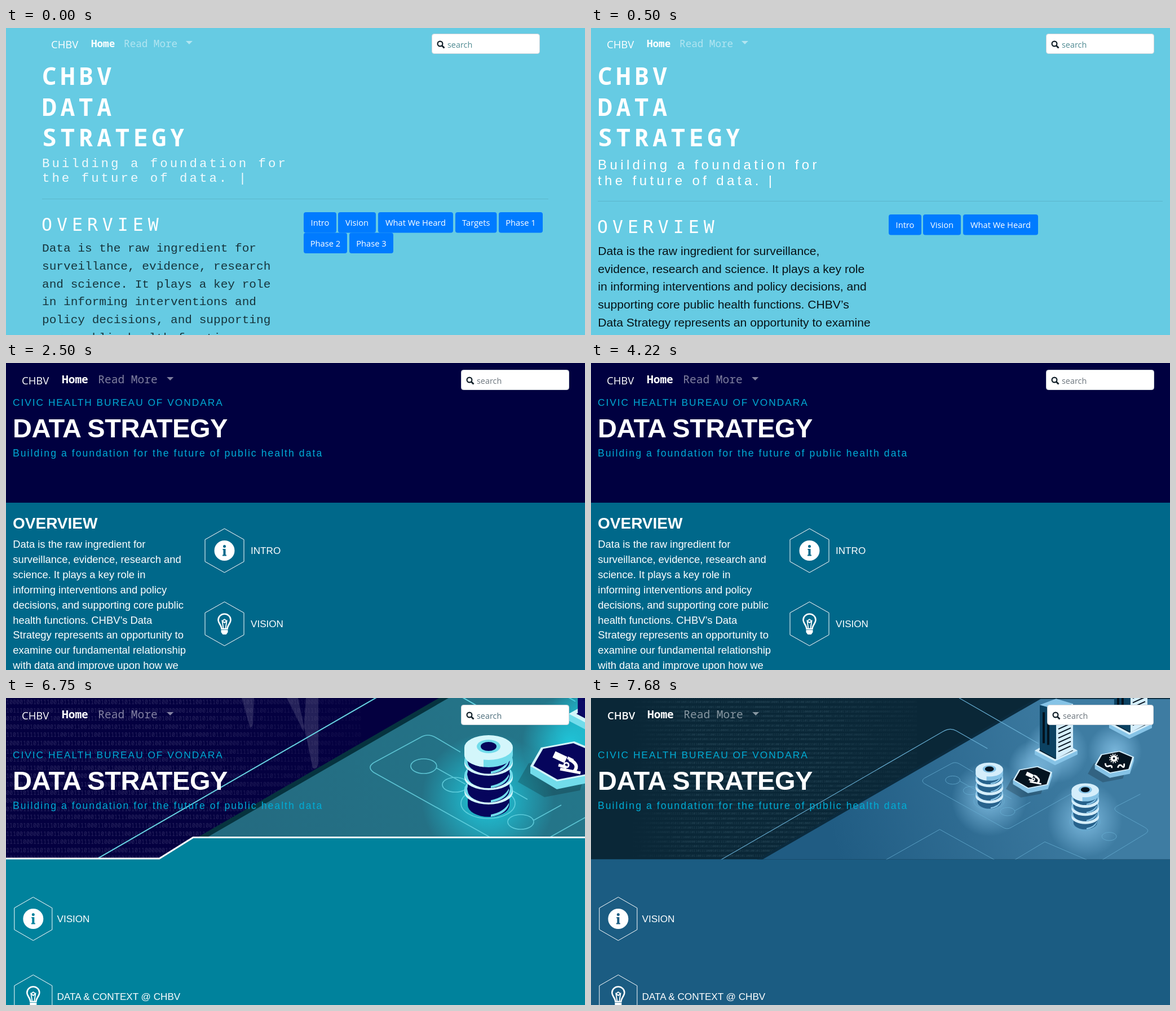
An HTML page for the animation above (8000 ms loop, 1027 by 545 pixels).

```html
<!DOCTYPE html>
<html lang="en">
<head>
<meta charset="utf-8">
<title>Data Strategy</title>
<style>
html, body { margin: 0; width: 100%; height: 100%; overflow: hidden; }
svg { display: block; width: 100vw; height: 100vh; }
text { white-space: pre; }
.ui { font-family: "Open Sans", "Noto Sans", sans-serif; }
.code { font-family: "Noto Sans Mono", monospace; }
.wide { font-family: "DejaVu Sans Mono", monospace; }
.type { font-family: "Liberation Mono", monospace; }
.sans { font-family: "Liberation Sans", Arial, sans-serif; }
</style>
</head>
<body>
<svg id="stage" viewBox="0 0 1027 545" preserveAspectRatio="none"></svg>
<script>
const ORG = 'CHBV', AGENCY = 'CIVIC HEALTH BUREAU OF VONDARA';
const TAGLINE = 'Building a foundation for the future of public health data';

const text = (cls, x, y, size, str, fill = '#fff', extra = '') =>
  `<text class="${cls}" x="${x}" y="${y}" font-size="${size}" fill="${fill}" ${extra}>${str.replace(/&/g, '&amp;')}</text>`;
const lines = (cls, x, y, step, size, list, fill, extra) =>
  list.map((s, i) => text(cls, x, y + i * step, size, s, fill, extra)).join('');
const spaced = n => `letter-spacing="${n}"`;
const bold = 'font-weight="700" ';
const rect = (x, y, w, h, fill, extra = '') =>
  `<rect x="${x}" y="${y}" width="${w}" height="${h}" fill="${fill}" ${extra}/>`;
const path = (d, fill, extra = '') => `<path d="${d}" fill="${fill}" ${extra}/>`;
const oval = (x, y, rx, ry, fill, extra = '') =>
  `<ellipse cx="${x}" cy="${y}" rx="${rx}" ry="${ry}" fill="${fill}" ${extra}/>`;
const at = (x, y, body, k = 1) => `<g transform="translate(${x} ${y}) scale(${k})">${body}</g>`;

function nav({ x = 28, y = 0, size = 17.6, muted, hint, boxX = 835 - x, weight = 400 }) {
  const pitch = size * .6, home = x + 71, more = home + pitch * 5.5;
  const caret = more + pitch * 10.5 - 1;
  return text('ui', x, 36 + y, 18.5, ORG, '#fff', `font-weight="${weight}"`) +
    text('code', home, 34 + y, size, 'Home', '#fff', 'font-weight="600"') +
    text('code', more, 34 + y, size, 'Read More', muted) +
    path(`M${caret} ${23 + y}h12l-6 6z`, muted) +
    rect(boxX + .5, 10.5 + y, 1026 - x - boxX, 35, '#fff', 'rx="4" stroke="#ced4da"') +
    `<g fill="none" stroke="#111f28" stroke-width="2.2"><circle cx="${boxX + 15}" cy="${28 + y}" r="4.4"/>` +
    `<path d="M${boxX + 18} ${31 + y}l4.5 4.5" stroke-width="2.8"/></g>` +
    text('ui', boxX + 28, 35 + y, 14.4, 'search', hint);
}

const button = (x, y, w, label) => rect(x, y, w, 36.5, '#007bff', 'rx="4"') +
  text('ui', x + w / 2, y + 24, 14.7, label, '#fff', 'text-anchor="middle"');

function lightPage(x, shift, rest) {
  return rect(0, 0, 1027, 545, '#66cbe3') +
    nav({ x: x + 16, muted: '#b2e5f1', hint: '#4f8a92' }) +
    lines('code', x, 101, 54.5, 43, [ORG, 'DATA', 'STRATEGY'], '#fff', bold + spaced(6.6)) +
    rect(x, 303 + shift, 1027 - 2 * x - 1, 1, '#5bb7cc') +
    text('wide', x - 1, 359.5 + shift, 31.5, 'OVERVIEW', '#fff', spaced(8)) +
    button(528, 327 + shift, 58, 'Intro') + button(589, 327 + shift, 67, 'Vision') +
    button(660, 327 + shift, 133, 'What We Heard') + rest;
}

const monoPage = () => lightPage(64, 0,
  button(797, 327, 73.5, 'Targets') + button(874, 327, 78, 'Phase 1') +
  button(528, 363.5, 77, 'Phase 2') + button(609, 363.5, 78, 'Phase 3') +
  lines('type', 64, 247, 25.5, 22.4,
    ['Building a foundation for', 'the future of data. |'], '#f0fafd', spaced(4)) +
  lines('type', 64, 397, 31.75, 21.12,
    ['Data is the raw ingredient for', 'surveillance, evidence, research', 'and science. It plays a key role',
      'in informing interventions and', 'policy decisions, and supporting', 'core public health functions.'], '#17353d'));

const arialPage = () => lightPage(12, 4,
  lines('sans', 12, 251, 27.5, 24,
    ['Building a foundation for', 'the future of data. |'], '#fff', spaced(5.4)) +
  lines('sans', 12.3, 403, 31.7, 21.12,
    ['Data is the raw ingredient for surveillance,', 'evidence, research and science. It plays a key role',
      'in informing interventions and policy decisions, and', `supporting core public health functions. ${ORG}’s`,
      'Data Strategy represents an opportunity to examine'], '#071318'));

const title = y => text('sans', 12, y, 17.3, AGENCY, '#00add6', spaced(2)) +
  text('sans', 12, y + 56, 47, 'DATA STRATEGY', '#fff', bold + spaced(-.5)) +
  text('sans', 12, y + 90, 17.6, TAGLINE, '#00add6', spaced(2.05));

const info = bg => oval(0, 0, 18, 18, '#fff') + oval(0, -7.5, 2.5, 2.5, bg) +
  path('M-3-3h5v10.5h1.5v2h-7v-2h1.5v-8.5h-1z', bg);
const bulb = () => `<g fill="none" stroke="#fff" stroke-width="2.6">
  <path d="M-5 9C-5 3-11-1-11-7A11 10.5 0 0 1 11-7C11-1 5 3 5 9z"/>
  <path d="M-2 8L-4-5L0-2L4-5L2 8M-4-5L0-8L4-5" stroke-width="1.8"/></g>` +
  path('M-6 11H6V15L3 19H-3L-6 15z', '#fff');

const badge = (x, y, w, h, icon, label, gap) =>
  at(x, y, path(`M0 ${-h}L${w} ${-h / 2}V${h / 2}L0 ${h}L${-w} ${h / 2}V${-h / 2}z`, 'none', 'stroke="#fff"') + icon) +
  text('sans', x + gap, y + 5.5, 17.1, label);

const plainPage = () => rect(0, 0, 1027, 545, '#00688a') + rect(0, 0, 1027, 248, '#000040') +
  nav({ y: 2, size: 19.5, muted: '#80809f', hint: '#6c757d' }) + title(76) +
  text('sans', 12, 294, 28, 'OVERVIEW', '#fff', bold) +
  lines('sans', 12.3, 328, 26.9, 18.4,
    ['Data is the raw ingredient for', 'surveillance, evidence, research and', 'science. It plays a key role in',
      'informing interventions and policy', 'decisions, and supporting core public', `health functions. ${ORG}’s Data`,
      'Strategy represents an opportunity to', 'examine our fundamental relationship', 'with data and improve upon how we']) +
  badge(387.5, 333, 34.5, 39, info('#00688a'), 'INTRO', 46.5) +
  badge(387.5, 463, 34.5, 39, bulb(), 'VISION', 46.5);

function digits() {
  let seed = 7, out = '';
  for (let y = -135; y < 375; y += 14.6) {
    let row = '';
    for (let i = 0; i < 155; i++) {
      seed = (seed * 16807) % 2147483647;
      row += seed % 100 < 50 ? '0' : '1';
    }
    out += `<text x="-300" y="${y}">${row}</text>`;
  }
  return out;
}

const cylinder = (y, rx, ry, h, side, top) =>
  path(`M${-rx} ${y}v${h}a${rx} ${ry} 0 0 0 ${2 * rx} 0v${-h}z`, side) + oval(0, y, rx, ry, top);

// Isometric scene shared by both illustrated pages.
function art(id, c) {
  const glow = (x, y, r) => `<circle cx="${x}" cy="${y}" r="${r}" fill="url(#glow${id})"/>`;
  let coins = '';
  for (let y = 88; y >= 0; y -= 25.5) {
    coins += cylinder(y, 37, 21, 12, c.coin, c.coin) +
      path(`M4 ${y + 29}Q28 ${y + 24} 36 ${y + 8}V${y + 12}Q30 ${y + 29} 4 ${y + 33}z`, c.mid);
    if (y > 20) coins += cylinder(y - 16, 43, 22, c.rim, c.light, c.mid) + oval(0, y - 17, 38, 18, c.coin);
  }
  coins += cylinder(-2, 43, 22, 13, c.mid, c.light) + path('M-43-2v13a43 22 0 0 0 34 21.5v-14z', c.light) +
    oval(0, -4, 21, 12, c.mid) + oval(0, -4, 14, 8, c.ink);
  const hex = 'M-60 8L-41-25L18-36L63-17L50 23L-13 35z';
  const tile = mark => path(hex, '#0003', 'transform="translate(-22 28)"') +
    path('M-60 8V21L-13 49L50 36L63-4V-17z', c.mid) + path(hex, c.light) +
    path(hex, c.ink, 'transform="scale(.91)"') + mark;
  const scope = `<g fill="none" stroke="#fff"><path d="M-18-13L3-3" stroke-width="12"/>
    <path d="M6-7L16-2" stroke-width="5"/><path d="M9-4Q28 5 18 17" stroke-width="6"/>
    <path d="M-7 13L29 20M-10 6L4 10" stroke-width="5"/><circle cx="4" cy="6" r="4" stroke-width="3"/></g>`;
  const germs = `<g fill="none" stroke="#fff"><circle cy="-12" r="7" stroke-width="7"/>
    <circle cy="-12" r="13" stroke-width="4" stroke-dasharray="3 4"/>
    <path d="M-27 3q0 13 11 9t9 6M12 17q5-14 13-5t7-8" stroke-width="5"/></g>`;
  let vents = '';
  for (let y = -70; y < 4; y += 8) vents += `M4 ${y}l22-10`;
  const base = 'M-38 0L0-21L38 0L-2 19z';
  const server = path('M-38 0v7l36 19l40-19V0z', c.mid) + path(base, c.light) +
    path(base, c.ink, 'transform="scale(.8)"') +
    path('M-29-81V-1L0 15V-73z', c.tower) + path('M0-73V15L30-1V-83z', c.light) +
    path('M-29-81L0-92L30-83L0-73z', c.mid) + path(vents, 'none', `stroke="${c.ink}" stroke-width="2"`) +
    path('M-22-68v55M-14-65v55', 'none', `stroke="${c.ink}" stroke-width="4"`);
  const ring = (x, y) => oval(x, y, 23, 13, 'none');
  return `<defs>
    <radialGradient id="glow${id}"><stop stop-color="${c.glow}"/><stop offset=".4" stop-color="${c.glow}" stop-opacity=".65"/><stop offset="1" stop-color="${c.glow}" stop-opacity="0"/></radialGradient>
    <linearGradient id="floor${id}" gradientUnits="userSpaceOnUse" x1="350" y1="250" x2="1150" y2="30"><stop stop-color="${c.floor[0]}"/><stop offset="1" stop-color="${c.floor[1]}"/></linearGradient>
    <linearGradient id="fade${id}" gradientUnits="userSpaceOnUse" x1="-270" y1="0" x2="640" y2="0"><stop stop-color="${c.digit}" stop-opacity="0"/><stop offset=".22" stop-color="${c.digit}"/><stop offset=".65" stop-color="${c.digit}"/><stop offset="1" stop-color="${c.digit}" stop-opacity=".25"/></linearGradient>
    </defs><g class="code" font-size="10" fill="url(#fade${id})">${digits()}</g>${c.haze}` +
    path('M117 376L1000-134H1450V376z', c.band) + path('M134 376L1017-134H1450V376z', `url(#floor${id})`) +
    path('M5 376L711-32Q733-45 752-34L850 22M761-137L1010 6', 'none', `stroke="${c.line}" stroke-width="2"`) +
    glow(855, 180, 118) + glow(1156, 246, 118) + glow(1000, 80, 85) + glow(1250, 30, 85) + glow(1066, 30, 100) +
    `<g fill="none" stroke="${c.line}" stroke-width="1.7" opacity=".8">
    <path d="M652 115L735 70Q748 62 762 70L806 96M652 115Q640 123 652 132L896 268Q910 278 924 270L1145 146M763 124L815 153M936 217L985 190M890 160L925 180
      M935 372L1030 315L1170 375M1200 378L1345 290Q1362 280 1345 270L1262 224Q1240 212 1256 203L1330 165M530 372L700 276L880 376"/>` +
    ring(741, 121) + ring(797, 154) + ring(913, 220) + ring(1232, 298) +
    oval(855, 187, 48, 27, 'none') + oval(1156, 252, 48, 27, 'none') + '</g>' +
    at(1299, -55, server, 1.77) + at(1065.5, 28, server, 1.77) + at(990, 113, tile(scope)) + at(1247, 65, tile(germs)) +
    at(856, 90, coins) + at(1157, 155, coins);
}

const hero = (id, shape, bg, body) => `<clipPath id="clip${id}"><path d="${shape}"/></clipPath>
  <g clip-path="url(#clip${id})">${path(shape, bg)}${body}</g>`;
const badges = bg => badge(48.3, 392, 33.5, 38.5, info(bg), 'VISION', 42.2) +
  badge(48.3, 530, 33.5, 38.5, bulb(), `DATA & CONTEXT @ ${ORG}`, 42.2);

const haze = path('M418 0h22l-2 46q-4 12-7 0zM498 0h20l26 124q8 4 10-8V0h-22l-4 60z', '#fff', 'opacity=".13"');
const tealPage = () => rect(0, 0, 1027, 545, '#00829c') +
  hero('A', 'M0 0H1027V247H332L272 285H0z', '#040040', art('A', {
    ink: '#06055c', coin: '#06055c', rim: 5, light: '#d3f6fb', mid: '#72dceb', tower: '#0b0a66',
    glow: '#1fc5d9', line: '#69d6e4', floor: ['#246a80', '#24798c'], digit: '#29265f', band: '#06333f', haze })) +
  path('M0 285H272L332 247.5H1027', 'none', 'stroke="#fff" stroke-width="3"') +
  nav({ y: 2, size: 19.5, muted: '#8583a3', hint: '#4f6f7d' }) + title(107) + badges('#00829c');

const bluePage = () => rect(0, 0, 1027, 545, '#1b5c82') +
  hero('B', 'M0 0H1027V286.5H0z', '#0a2737', '<g transform="translate(588 148) scale(.565) translate(-646 -125)">' +
    art('B', {
      ink: '#04131f', coin: '#27628c', rim: 10, light: '#d5eefb', mid: '#86c3e6', tower: '#0c4262',
      glow: '#78b5da', line: '#67aed3', floor: ['#205c83', '#3e7ca2'], digit: '#28495a', band: '#0b2b3e', haze: '' }) + '</g>') +
  nav({ x: 29, y: 2, size: 19.5, muted: '#8797a1', hint: '#6c757d', boxX: 809, weight: 600 }) +
  title(107) + badges('#1b5c82');

const starts = [0, 500, 2500, 5360, 7680];
const stage = document.getElementById('stage');
stage.innerHTML = [monoPage, arialPage, plainPage, tealPage, bluePage].map(page => `<g>${page()}</g>`).join('');
const pages = [...stage.children];

function draw(now) {
  const t = now % 8000;
  const current = starts.filter(s => s <= t).length - 1;
  pages.forEach((page, i) => { page.style.display = i === current ? '' : 'none'; });
}
const origin = performance.now();
function tick() {
  draw(performance.now() - origin);
  requestAnimationFrame(tick);
}
tick();
</script>
</body>
</html>
```
